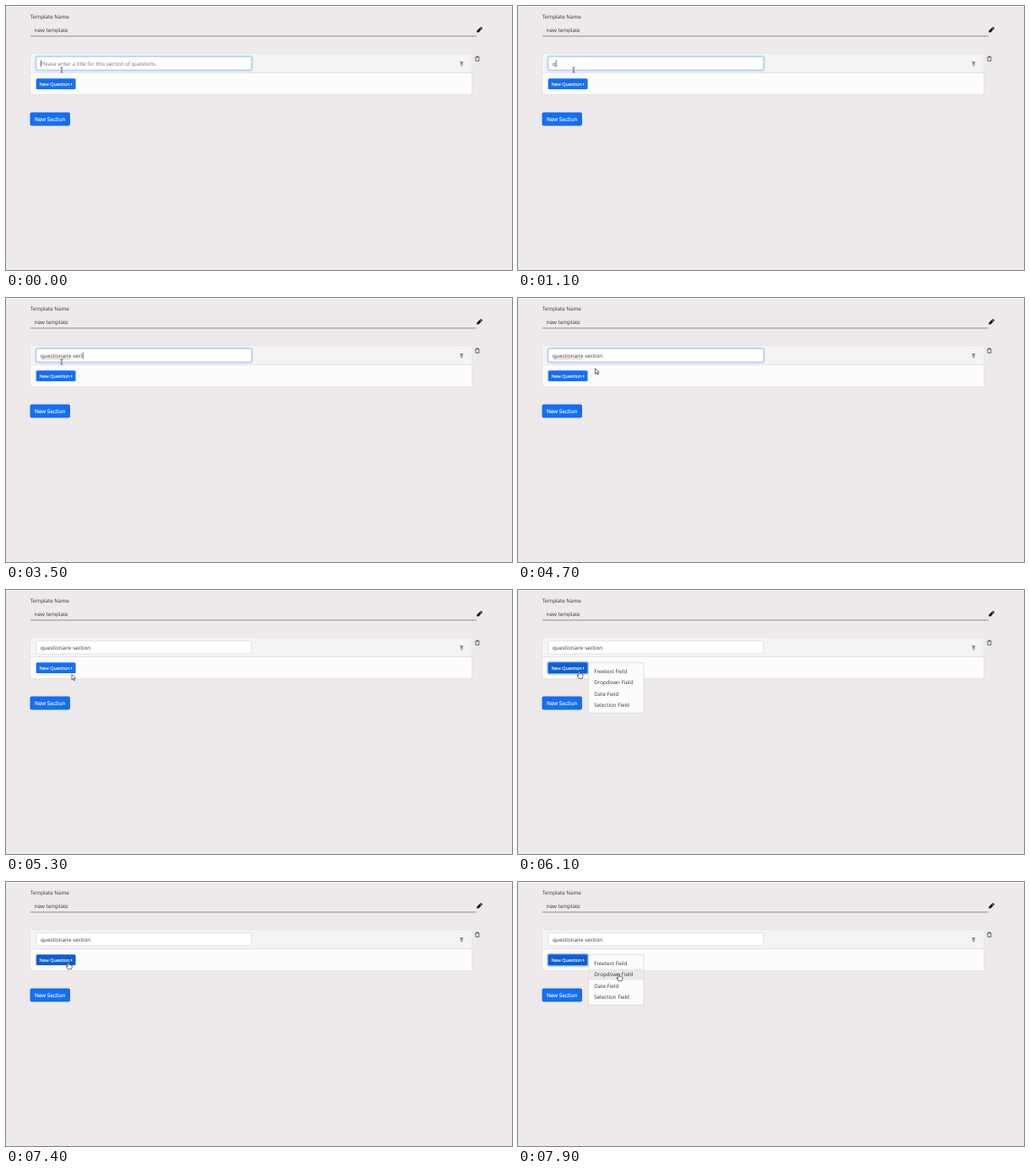
These frames come from a looping animation (600 px wide and 314 px high, 8 s). An HTML page:

```html
<!DOCTYPE html>
<html lang="en">
<head>
<meta charset="utf-8">
<title>Template editor</title>
<style>
  html, body { margin: 0; width: 100%; height: 100%; overflow: hidden; background: #eee9ea; }
  svg { display: block; width: 600px; height: 314px; }
  text { font-family: "Open Sans", "Noto Sans", sans-serif; font-size: 6.25px; fill: #30343a; white-space: pre; text-rendering: geometricPrecision; }
  .light { fill: #fff; stroke: #fff; stroke-width: .14; }
  .pointer { fill: #fff; stroke: #222; stroke-width: .65; stroke-linejoin: round; }
</style>
</head>
<body>
<svg viewBox="0 0 600 314">
  <rect width="600" height="314" fill="#eee9ea"/>
  <rect width="600" height="1" fill="#f8f6f6"/>

  <text x="28.8" y="14.9">Template Name</text>
  <text x="33.8" y="30.6">new template</text>
  <rect x="29" y="35.5" width="529" height=".8" fill="#777477"/>
  <g transform="translate(558.2 31.6) rotate(-45)" fill="#111">
    <path d="M0 0L2-1.4H6.4V1.4H2Z"/>
    <path d="M6.9-1.4H7.7Q8.5-1.4 8.5-.6V.6Q8.5 1.4 7.7 1.4H6.9Z"/>
  </g>

  <rect x="28.9" y="56.9" width="523.7" height="48.7" fill="#fdfcfd" stroke="#dad7da" stroke-width=".6"/>
  <rect x="29.2" y="57.2" width="523.1" height="22.3" fill="#f4f3f5"/>
  <rect x="29" y="79.2" width="523.5" height=".6" fill="#d9d6d9"/>
  <path d="M538.4 66.7H542M540.2 66.7V68.4M538.7 67.6L540.2 68.8L541.7 67.6M538.5 69.5L540.2 71L541.9 69.5" fill="none" stroke="#222" stroke-width=".6"/>
  <path d="M556.4 60.8H561.4M558 60.6V59.9H559.8V60.6M557 61V65.3H560.8V61" fill="none" stroke="#333" stroke-width=".75"/>

  <rect id="ring" x="35.1" y="59.5" width="256.8" height="17.3" rx="2.8" fill="none" stroke="#c0d6f8" stroke-width="1.7"/>
  <rect id="field" x="36" y="60.4" width="255" height="15.5" rx="1.9" fill="#fff" stroke-width=".6"/>
  <text id="hint" x="41" y="70.6" style="fill:#6c7279">Please enter a title for this section of questions</text>
  <text id="typed" x="41" y="70.6"></text>
  <path id="wave" fill="none" stroke="#c9564f" stroke-width=".5"/>
  <rect id="caret" y="64.4" width=".6" height="8" fill="#222"/>

  <rect id="glow" x="35.2" y="85.7" width="48.1" height="14.1" rx="2.1" fill="none" stroke="#8cb7f8" stroke-width="1.5"/>
  <rect id="add" x="35.7" y="86.3" width="46.9" height="12.8" rx="1.5"/>
  <text class="light" x="39.4" y="94.9" style="font-size:5.5px">New Question</text>
  <path class="light" d="M77.1 91.5L78.7 93L77.1 94.5Z"/>

  <rect x="28.5" y="126.6" width="47.5" height="15.8" rx="2" fill="#146ef5"/>
  <text class="light" x="33.9" y="137" style="font-size:6.36px">New Section</text>

  <g id="menu">
    <rect x="83.6" y="86.3" width="65.5" height="60" rx="2" fill="#fdfcfd" stroke="#cbc8cb" stroke-width=".6"/>
    <rect id="mark" x="83.9" width="64.9" height="13.2" fill="#eae8ea"/>
  </g>

  <path id="beam" d="M-1.4-3.2Q0-3.2 0-2.4Q0-3.2 1.4-3.2M0-2.6V2.6M-1.4 3.2Q0 3.2 0 2.4Q0 3.2 1.4 3.2" fill="none" stroke="#333" stroke-width=".7"/>
  <path id="arrow" class="pointer" d="M0 0V6.6L1.5 5.2L2.6 7.6L3.7 7.1L2.6 4.8H4.6Z"/>
  <path id="hand" class="pointer" d="M-.8 .6Q0-.5.8.6V3.4L1.4 3.1L2.1 3.6L2.8 3.4L3.4 4L4.2 4V6.4L3.4 8.7H-.7L-2.6 5.6Q-3 4.6-2.2 4.6L-.8 5.8Z"/>
</svg>
<script>
const $ = id => document.getElementById(id);
const LOOP = 8000, STEP = 100;
const phrase = "questionaire section";
const items = ["Freetext Field", "Dropdown Field", "Date Field", "Selection Field"];
const rowY = i => 90.3 + 13.2 * i;

const bursts = [
  { from: 1000, chars: 3, gap: 200 },
  { from: 1700, chars: 4, gap: 100 },
  { from: 2200, chars: 9, gap: 110 },
  { from: 3500, chars: 4, gap: 100 }
];

// each move eases to x, y; bow bends it to the right
const start = { x: 66, y: 76 };
const moves = [
  { from: 4400, to: 5200, x: 78, y: 100.2, bow: 26 },
  { from: 5300, to: 5800, x: 72.8, y: 96.4 },
  { from: 6100, to: 6500, x: 113, y: 97 },
  { from: 6800, to: 7200, x: 74, y: 95 },
  { from: 7500, to: 7900, x: 119.7, y: 109 }
];

items.forEach((label, i) => {
  const row = document.createElementNS("http://www.w3.org/2000/svg", "text");
  row.setAttribute("x", 90.2);
  row.setAttribute("y", rowY(i) + 8.8);
  row.textContent = label;
  $("menu").append(row);
});

const set = (id, name, value) => $(id).setAttribute(name, value);
const show = (id, on) => set(id, "visibility", on ? "visible" : "hidden");
const within = (t, a, b) => t >= a && t < b;
const clamp = (v, lo, hi) => Math.min(hi, Math.max(lo, v));

function typedCount(t) {
  return bursts.reduce((sum, b) =>
    sum + clamp(Math.floor((t - b.from) / b.gap) + 1, 0, b.chars), 0);
}

function pointerAt(t) {
  let { x, y } = start;
  for (const m of moves) {
    const u = clamp((t - m.from) / (m.to - m.from), 0, 1);
    const k = u * u * (3 - 2 * u);
    x += (m.x - x) * k + (m.bow || 0) * Math.sin(Math.PI * k);
    y += (m.y - y) * k;
  }
  return [x, y];
}

function draw(t) {
  const count = typedCount(t);
  const focused = t < 4800;
  const open = within(t, 5900, 6600) || t >= 7500;
  const [x, y] = pointerAt(t);
  const overAdd = x > 36 && x < 82.5 && y > 86.5 && y < 99;
  const row = open && x > 84 && x < 149 ? Math.floor((y - rowY(0)) / 13.2) : -1;
  const inRow = row >= 0 && row < items.length;

  $("typed").textContent = phrase.slice(0, count);
  const width = count ? $("typed").getComputedTextLength() : 0;
  show("hint", !count);
  show("ring", focused);
  set("field", "stroke", focused ? "#9cc3fb" : "#d3d2d7");
  set("caret", "x", 41 + width);
  show("caret", t < 4400 && !within(t, 600, 1000));
  show("wave", focused && count > 12);

  show("glow", open);
  set("add", "fill", open || overAdd ? "#0b5ed7" : "#146ef5");
  set("menu", "display", open ? "inline" : "none");
  set("mark", "y", rowY(row));
  set("mark", "display", inRow ? "inline" : "none");

  const hand = overAdd || inRow;
  const kind = y < 77 ? "beam" : hand ? "hand" : "arrow";
  for (const id of ["beam", "arrow", "hand"]) show(id, id === kind);
  set(kind, "transform", `translate(${x} ${y})`);
}

set("wave", "d", "M41 72.3" + "q.4-.7.8 0t.8 0".repeat(22));

function tick(now) {
  draw(Math.floor(now % LOOP / STEP) * STEP);
  requestAnimationFrame(tick);
}
draw(0);
requestAnimationFrame(tick);
</script>
</body>
</html>
```
